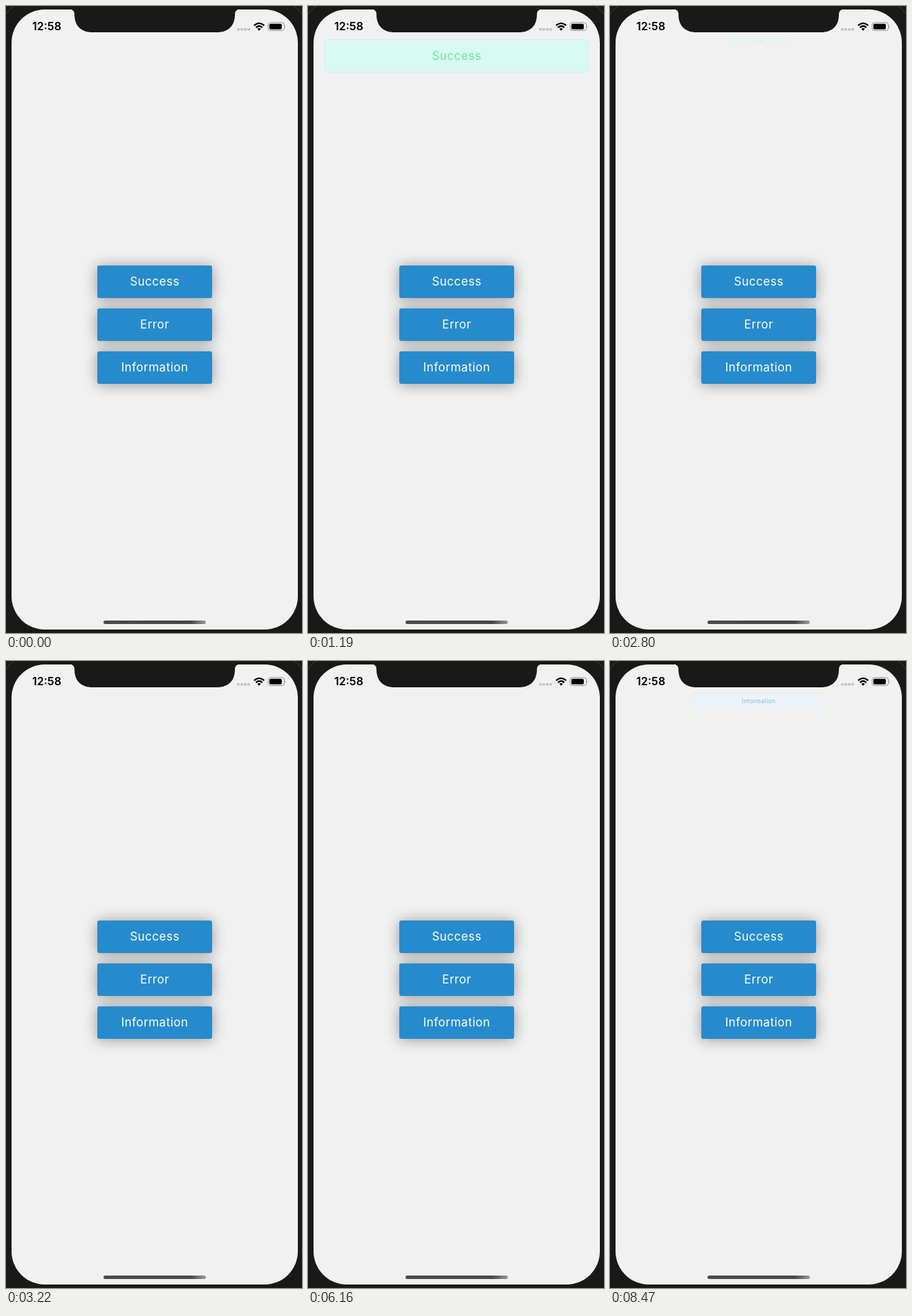
An HTML page that plays this animation: 428 by 906 pixels, repeating every 8.54 s.

```html
<!DOCTYPE html>
<html lang="en">
<head>
<meta charset="utf-8">
<title>Toast messages</title>
<style>
  html, body { margin: 0; width: 100%; height: 100%; overflow: hidden; background: #191919; }
  svg { display: block; width: 100vw; height: 100vh; }
  .label { font: 400 17px Inter, "Open Sans", sans-serif; letter-spacing: .5px; text-anchor: middle; }
  .clock { font: 600 16px Inter, "Liberation Sans", sans-serif; }
  .shadow { filter: drop-shadow(0 1px 10px rgba(0, 0, 0, .38)); }
</style>
</head>
<body>
<svg viewBox="0 0 428 906">
  <defs>
    <linearGradient id="bar">
      <stop offset="0" stop-color="#4a4a4a"/>
      <stop offset=".85" stop-color="#484848"/>
      <stop offset="1" stop-color="#9a9a9a"/>
    </linearGradient>
  </defs>

  <rect width="428" height="906" fill="#191919"/>
  <path d="M0 12Q4 4 12 0M416 0Q424 4 428 12" fill="none" stroke="#3a3a3a"/>
  <rect x="8" y="5" width="414" height="896" rx="48" fill="#f1f1f1"/>
  <path d="M92 4.5Q99 5 99 12C99 30 110 38 125 38H305C320 38 331 30 331 12Q331 5 338 4.5Z" fill="#191919"/>

  <text class="clock" x="38" y="35.3">12:58</text>
  <g fill="#c4c4c4">
    <rect x="334" y="32" width="4" height="3.5" rx="1"/>
    <rect x="339" y="32" width="4" height="3.5" rx="1"/>
    <rect x="344" y="32" width="4" height="3.5" rx="1"/>
    <rect x="349" y="32" width="4" height="3.5" rx="1"/>
  </g>
  <g fill="none" stroke="#000" stroke-width="2.3">
    <path d="M358.7 28.2Q366 21.6 373.3 28.2"/>
    <path d="M361.4 31.1Q366 27 370.6 31.1"/>
  </g>
  <path d="M363.4 33Q366 30.8 368.6 33L366 35.7Z"/>
  <rect x="379" y="24" width="23.5" height="11.5" rx="3.3" fill="none" stroke="#929292"/>
  <rect x="380.8" y="25.8" width="18" height="8" rx="1.8"/>
  <path d="M403.7 28Q405.5 29.7 403.7 31.6Z" fill="#929292"/>

  <g id="shadows"></g>
  <g id="faces"></g>
  <g id="toasts"></g>

  <rect x="141" y="888" width="148" height="5" rx="2.5" fill="url(#bar)"/>
</svg>

<script>
const LOOP = 8540, STEP = 70, EXIT = 560;

// Times in ms: press and release of the button, then the toast's own times.
const items = [
  { text: "Success", y: 375, press: 210, release: 420,
    enter: 630, grow: 350, drift: 2030, leave: 2520,
    fill: "#d9faf2", edge: "#c8f3e9", ink: "#74e3a8" },
  { text: "Error", y: 437, press: 3080, release: 3220,
    enter: 3360, grow: 630, drift: 4760, leave: 5320,
    fill: "#fdeeee", edge: "#fce2e2", ink: "#c6202a" },
  { text: "Information", y: 499, press: 6020, release: 6160,
    enter: 6300, grow: 420, drift: 7490, leave: 8260,
    fill: "#e9f3fd", edge: "#dcecfb", ink: "#268bcc" }
];

function add(parent, tag, attrs, text = "") {
  const node = document.createElementNS("http://www.w3.org/2000/svg", tag);
  for (const key in attrs) node.setAttribute(key, attrs[key]);
  node.textContent = text;
  return parent.appendChild(node);
}

const layer = id => document.getElementById(id);

for (const item of items) {
  const box = { x: 132, y: item.y, width: 166, height: 47, rx: 3 };
  add(layer("shadows"), "rect", { ...box, class: "shadow", fill: "#c4c4c4" });

  item.face = add(layer("faces"), "g", {});
  add(item.face, "rect", { ...box, fill: "#268bcc" });
  add(item.face, "text", { class: "label", x: 215, y: item.y + 29.3, fill: "#fff" }, item.text);

  // Drawn around its own centre so that scaling needs no offset.
  item.toast = add(layer("toasts"), "g", {});
  add(item.toast, "rect", {
    x: -190.5, y: -23.5, width: 381, height: 47, rx: 4, fill: item.fill, stroke: item.edge
  });
  add(item.toast, "text", { class: "label", x: 0, y: 6.2, fill: item.ink }, item.text);
}

function ease(x) {
  x = Math.min(1, Math.max(0, x));
  return x < .5 ? .5 * (2 * x) ** 2.5 : 1 - .5 * (2 - 2 * x) ** 2.5;
}

function toastScale(item, t) {
  if (t < item.enter) return 0;
  if (t >= item.leave) return 1 - ease((t - item.leave + STEP) / EXIT);
  if (t >= item.drift) return t < item.drift + STEP ? .995 : .992;
  return ease((t - item.enter + 2 * STEP) / (item.grow + STEP));
}

function faceOpacity(item, t) {
  if (t < item.press || t >= item.release) return 1;
  return t < item.press + STEP ? .85 : .75;
}

function draw(now) {
  const t = Math.floor((now % LOOP) / STEP) * STEP;
  for (const item of items) {
    const s = toastScale(item, t);
    item.toast.setAttribute("transform", `translate(215 ${43 + 29 * s}) scale(${s})`);
    item.toast.setAttribute("opacity", s);
    item.toast.setAttribute("visibility", s > 0 ? "visible" : "hidden");
    item.face.setAttribute("opacity", faceOpacity(item, t));
  }
}

const start = performance.now();
function tick() {
  draw(performance.now() - start);
  requestAnimationFrame(tick);
}
tick();
</script>
</body>
</html>
```
